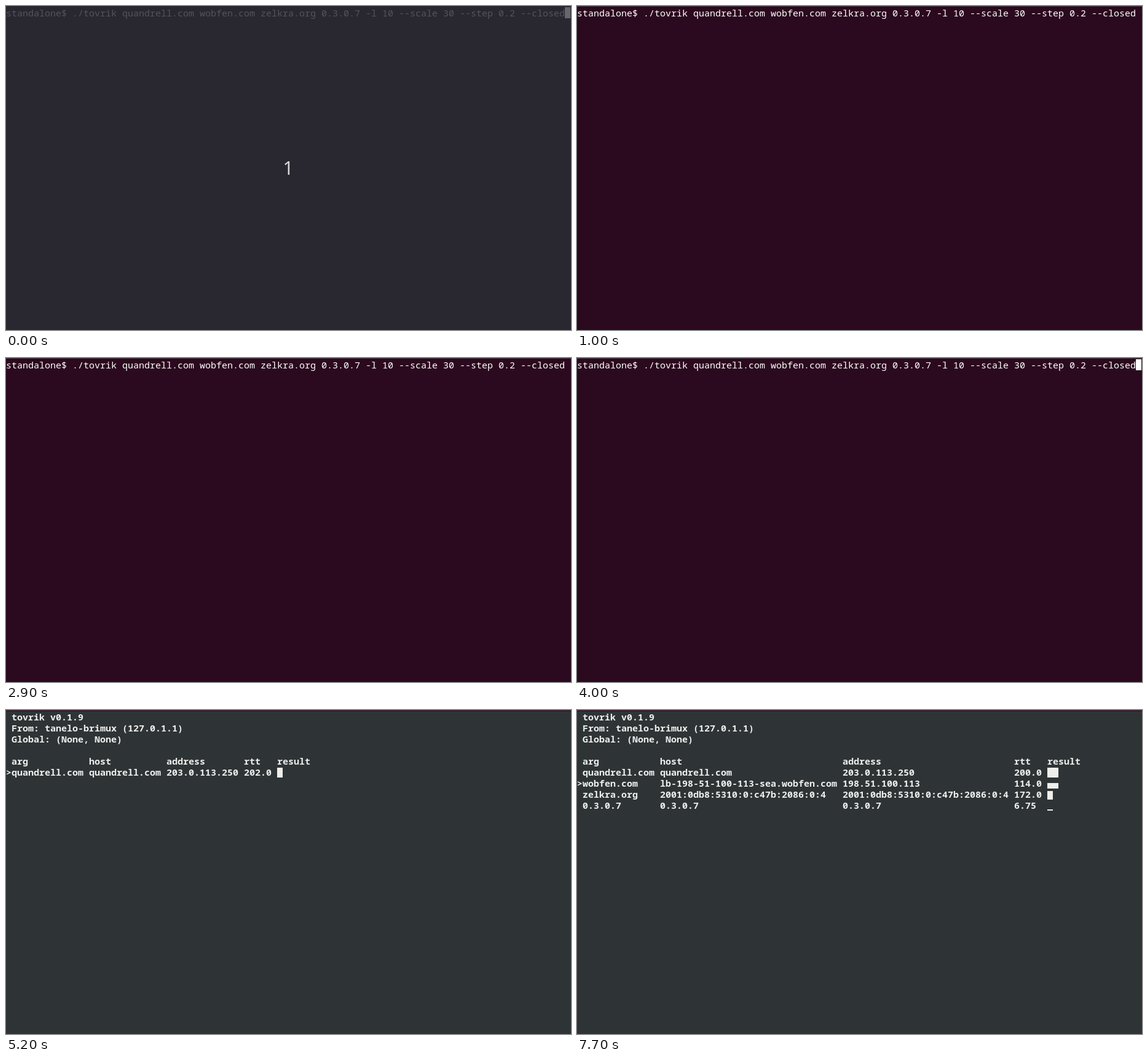
Recreate the animation shown at these times as an HTML page with a canvas. Size 919x528 px, loop 8 s.

```html
<!DOCTYPE html>
<html>
<head>
<meta charset="utf-8">
<style>
html, body { margin: 0; width: 100%; height: 100%; overflow: hidden; background: #2b091e; }
canvas { display: block; }
</style>
</head>
<body>
<canvas id="stage" width="919" height="528"></canvas>
<script>
const ctx = document.getElementById('stage').getContext('2d');
const LOOP = 8000, COL = 9, ROW = 18, TOP = 2;
const PURPLE = '#2b091e', SLATE = '#2e3436', PALE = '#eeeeec';
const command = 'standalone$ ./tovrik quandrell.com wobfen.com zelkra.org 0.3.0.7 -l 10 --scale 30 --step 0.2 --closed';
const intro = ['tovrik v0.1.9', 'From: tanelo-brimux (127.0.1.1)', 'Global: (None, None)'];
const ipv6 = '2001:0db8:5310:0:c47b:2086:0:4';
const hosts = [
  { arg: 'quandrell.com', host: 'quandrell.com', address: '203.0.113.250', pings: [[5200, '202.0'], [7500, '200.0']] },
  { arg: 'wobfen.com', host: 'lb-198-51-100-113-sea.wobfen.com', address: '198.51.100.113', pings: [[5500, '114.0'], [7700, '114.0']] },
  { arg: 'zelkra.org', host: ipv6, address: ipv6, pings: [[6000, '172.0']] },
  { arg: '0.3.0.7', host: '0.3.0.7', address: '0.3.0.7', pings: [[6100, '6.75']] }
];

function rect(x, y, w, h, color) {
  ctx.fillStyle = color;
  ctx.fillRect(x, y, w, h);
}

function text(str, col, row, color, weight = 'bold') {
  ctx.font = weight + ' 15px "Noto Sans Mono", "DejaVu Sans Mono", monospace';
  ctx.textAlign = 'left';
  ctx.fillStyle = color;
  ctx.fillText(str, col * COL, TOP + row * ROW + 15);
}

function cursor(col, row, color = '#ffffff') {
  rect(col * COL, TOP + row * ROW, COL, ROW, color);
}

// True while the value sits in an "on" span of the toggle list
const isOn = (t, toggles) => toggles.filter(at => t >= at).length % 2 === 0;

function countdown() {
  rect(0, 0, 919, 528, '#292730');
  text(command, 0, 0, '#55535a', 'normal');
  cursor(command.length, 0, '#68666d');
  ctx.font = '30px "Noto Sans", "Open Sans", sans-serif';
  ctx.textAlign = 'center';
  ctx.fillStyle = '#d8d6da';
  ctx.fillText('1', 459, 275);
}

function shell(t) {
  rect(0, 0, 919, 528, PURPLE);
  rect(0, 0, 919, 1, '#483a43');
  if (t >= 5000) return cursor(0, 0);
  text(command, 0, 0, '#ffffff', 'normal');
  if (t >= 4600) cursor(0, 1);
  else if (isOn(t, [1000, 1100, 1700, 2300, 2900, 4000, 4100])) cursor(command.length, 0);
}

function monitor(t) {
  rect(0, 0, 919, 528, PURPLE);
  rect(0, 0, 919, 1, '#483a43');
  rect(0, TOP, 919, 526, SLATE);
  intro.forEach((line, i) => text(line, 1, i, PALE));

  const shown = hosts.filter(h => t >= h.pings[0][0]);
  const width = key => Math.max(...shown.map(h => h[key].length));
  const address = 15 + width('host') + 1;
  const rtt = address + width('address') + 1;
  const result = rtt + 6;
  const line = (row, cells) =>
    [1, 15, address, rtt, result].forEach((col, i) => text(cells[i] || '', col, row, PALE));

  line(4, ['arg', 'host', 'address', 'rtt', 'result']);
  let last = { at: 0 };
  shown.forEach((h, i) => {
    const row = 5 + i;
    const done = h.pings.filter(p => t >= p[0]);
    const [at, value] = done[done.length - 1];
    line(row, [h.arg, h.host, h.address, value]);
    done.forEach((p, n) => {
      const height = Math.round((Math.floor(p[1] / 30) + 1) * ROW / 8);
      rect((result + n) * COL, TOP + (row + 1) * ROW - height, COL, height, PALE);
    });
    if (at > last.at) last = { at, row, col: result + done.length };
  });
  text('>', 0, last.row, PALE);
  if (!isOn(t, [5200, 5800, 6400, 7000, 7600])) return;
  cursor(last.col, last.row, PALE);
}

function draw(now) {
  const t = now % LOOP;
  if (t < 300) countdown();
  else if (t < 5200) shell(t);
  else monitor(t);
  requestAnimationFrame(draw);
}
draw(performance.now());
</script>
</body>
</html>
```
